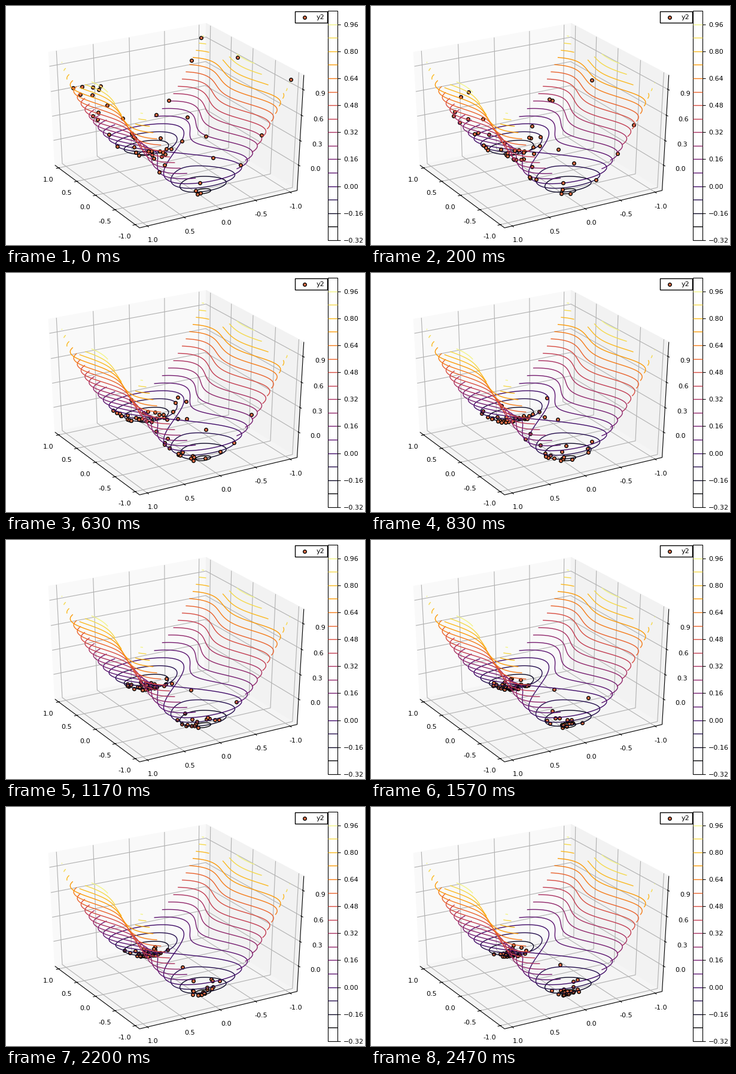
These frames come from a looping animation (600 px wide and 400 px high, 2.51 s). A matplotlib script:

```python
import numpy as np
import matplotlib.pyplot as plt
from matplotlib.animation import FuncAnimation
from matplotlib.collections import LineCollection
from matplotlib.patches import Polygon, Rectangle

WIDTH, HEIGHT = 600, 400
STEPS = 75
TICK_MS, LOOP_MS = 10, 2510
COS30 = np.sqrt(3) / 2
BOX_HALF = 0.5208
FONT = dict(family="DejaVu Sans", size=8, color="black", zorder=30)
MARKER = dict(s=16, linewidths=1, facecolors=[(0.889, 0.436, 0.278)],
              edgecolors="black")


def energy(x, y):
    return x**4 - x**2 + y**2


def to_box(x, y, z):
    """Data values to box units, where the box spans -1 to 1."""
    return x * 0.96 / 1.06, y * 0.96 / 1.06, (z - 0.375) * 0.96 / 0.6625


def project(u, v, w):
    """Box units to pixel x, pixel y and nearness (azimuth 150, elevation 30)."""
    right = -0.5 * u - COS30 * v
    toward = -COS30 * u + 0.5 * v
    near = COS30 * toward + 0.5 * w
    scale = 1 / (10 - BOX_HALF * near)
    px = 280.9 + 1520 * right * scale
    py = 194.1 - 1103 * (COS30 * w - 0.5 * toward) * scale
    return px, py, near


def pixel(u, v, w):
    return project(u, v, w)[:2]


fig = plt.figure(figsize=(WIDTH / 100, HEIGHT / 100), dpi=100, facecolor="white")
ax = fig.add_axes([0, 0, 1, 1])


def lines(segments, color, zorder, width=0.8):
    ax.add_collection(LineCollection(segments, colors=color, linewidths=width,
                                     zorder=zorder))


def label(x, y, text, ha="center"):
    ax.text(x, y + 4, text, ha=ha, va="baseline", **FONT)


def draw_box():
    panes = [
        ([(1, 1, -1), (1, 1, 1), (1, -1, 1), (1, -1, -1)], "0.975"),
        ([(1, -1, -1), (1, -1, 1), (-1, -1, 1), (-1, -1, -1)], "0.95"),
        ([(1, 1, -1), (-1, 1, -1), (-1, -1, -1), (1, -1, -1)], "0.9625"),
    ]
    for corners, shade in panes:
        ax.add_patch(Polygon([pixel(*c) for c in corners], fc=shade, ec=shade,
                             lw=0.8, zorder=1))

    grid, ticks = [], []
    inner, outer = 0.984, 1.032
    for value in np.linspace(1, -1, 5):
        t = to_box(value, 0, 0)[0]
        grid.append([pixel(t, 1, -1), pixel(t, -1, -1), pixel(t, -1, 1)])
        grid.append([pixel(-1, t, -1), pixel(1, t, -1), pixel(1, t, 1)])
        ticks.append([pixel(t, inner, -1), pixel(t, outer, -1)])
        ticks.append([pixel(-inner, t, -1), pixel(-outer, t, -1)])
        x, y = pixel(t, 1, -1)
        label(x - 17.5, y + 19, f"{value:.1f}")
        x, y = pixel(-1, t, -1)
        label(x + 9.8, y + 23.2, f"{value:.1f}")
    for value in np.arange(4) * 0.3:
        t = to_box(0, 0, value)[2]
        grid.append([pixel(1, 1, t), pixel(1, -1, t), pixel(-1, -1, t)])
        ticks.append([pixel(-inner, -1, t), pixel(-outer, -1, t)])
        x, y = pixel(-1, -1, t)
        label(x + 28.3, y + 6, f"{value:.1f}")

    edges = [[pixel(1, 1, -1), pixel(-1, 1, -1), pixel(-1, -1, -1),
              pixel(-1, -1, 1)]]
    lines(grid, "#b0b0b0", 2)
    lines(edges + ticks, "black", 3)


def level_color(level):
    return plt.get_cmap("inferno")((level + 0.24) / 1.24)


def draw_contours(levels):
    x, y = np.meshgrid(np.linspace(-1, 1, 121), np.linspace(-1, 1, 121))
    z = energy(x, y)
    for level in levels:
        px, py, near = project(*to_box(x, y, level))
        # The nearest part of a contour sets its place in the stack.
        front = near[np.abs(z - level) < 0.02].max()
        ax.contour(px, py, z, levels=[level], colors=[level_color(level)],
                   linewidths=1, linestyles="solid", zorder=10 + front)


def draw_colorbar(levels):
    left, right, top, bottom = 538, 554, 8, 392

    def bar_y(value):
        return bottom - (value + 0.32) / 1.36 * (bottom - top)

    ax.add_patch(Rectangle((left, top), right - left, bottom - top, fc="white",
                           ec="black", lw=0.8, zorder=20))
    rungs = [[(left, bar_y(v)), (right, bar_y(v))] for v in levels]
    lines(rungs, [level_color(v) for v in levels], 21, 1)
    marks = []
    for value in np.arange(-2, 7) * 0.16:
        y = bar_y(value)
        marks.append([(right, y), (right + 4.9, y)])
        label(right + 10.2, y, f"{value:.2f}".replace("-", "\u2212"), "left")
    lines(marks, "black", 21)


def draw_legend():
    ax.add_patch(Rectangle((483, 9), 54, 19, fc="white", ec="black", lw=1,
                           zorder=22))
    ax.scatter([498.9], [18.5], zorder=23, **MARKER)
    label(519, 18.5, "y2", "left")


def start(rng):
    """A few far points, a row along the left rim and an even scatter."""
    far = np.array([(-1, -1), (1, -0.97), (0.15, -0.98), (1, -0.83),
                    (-0.8, -0.75), (1, -0.5), (0.7, -0.6)])
    rim = np.column_stack([np.linspace(0.7, 0, 7), rng.uniform(0.92, 1, 7)])
    inside = np.column_stack([np.linspace(-1, 1, 36),
                              rng.uniform(-0.6, 0.9, 36)])
    return np.vstack([far, rim, inside]).T


def walk(x, y, rng, dt=0.02, heat=0.024):
    """Noisy descent: screen places and front depth for every step."""
    kick = np.sqrt(2 * heat * dt)
    path = []
    for _ in range(STEPS):
        px, py, near = project(*to_box(x, y, energy(x, y)))
        path.append((np.column_stack([px, py]), near.max()))
        x = x - dt * (4 * x**3 - 2 * x) + kick * rng.standard_normal(x.size)
        y = y - dt * 2 * y + kick * rng.standard_normal(y.size)
    return path


levels = np.arange(-3, 13) * 0.08
draw_box()
draw_contours(levels)
draw_colorbar(levels)
draw_legend()

rng = np.random.default_rng(4)
path = walk(*start(rng), rng)
dots = ax.scatter(*path[0][0].T, **MARKER)

ax.set_xlim(0, WIDTH)
ax.set_ylim(HEIGHT, 0)
ax.axis("off")


def update(tick):
    step = min(int(0.3 * (tick + 0.5)), STEPS - 1)
    places, front = path[step]
    dots.set_offsets(places)
    dots.set_zorder(10 + front)
    return (dots,)


anim = FuncAnimation(fig, update, frames=LOOP_MS // TICK_MS, interval=TICK_MS,
                     repeat=True, repeat_delay=0, blit=False)
plt.show()
```
